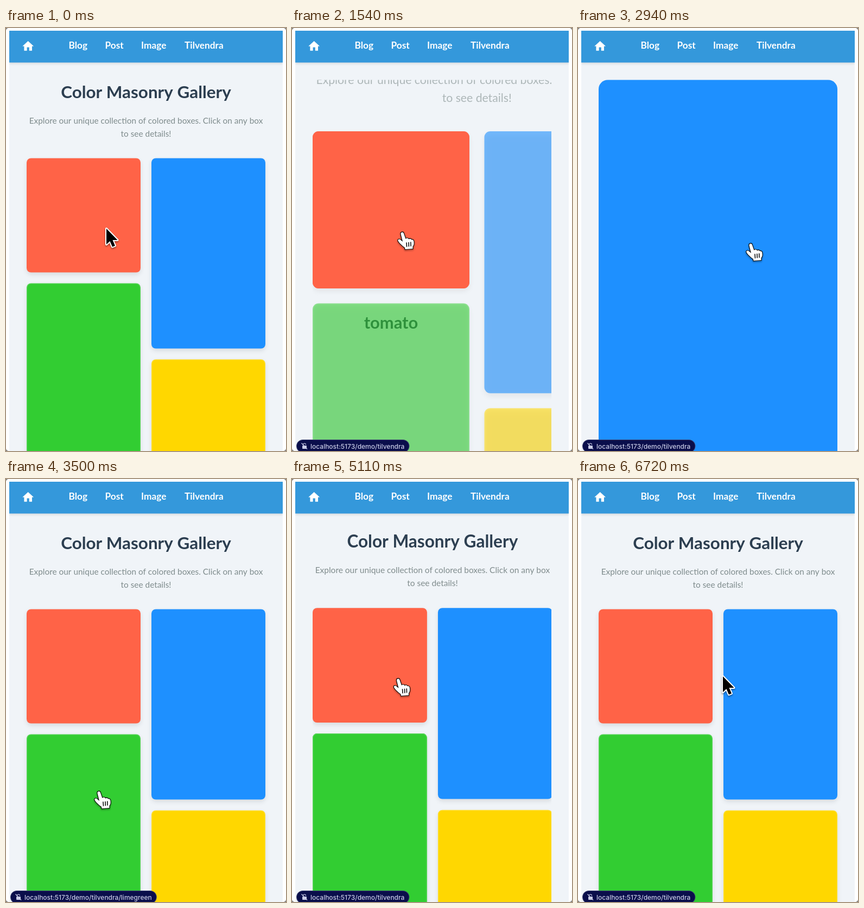
Write an HTML page with a canvas that moves like this. It is 516 px wide and 778 px high and loops after 6790 ms.

```html
<!DOCTYPE html>
<html lang="en">
<head>
<meta charset="utf-8">
<title>Color Masonry Gallery</title>
<style>
  html, body { margin: 0; width: 100%; height: 100%; overflow: hidden; background: #777; }
  canvas { display: block; }
</style>
</head>
<body>
<canvas width="516" height="778"></canvas>
<script>
const ctx = document.querySelector('canvas').getContext('2d');
const LOOP = 6790, STEP = 70, SPRING = 0.0145, SETTLE = 540;
const LEFT = 38, TOP = 95.5, COLUMN = 210, FULL = 440, PATH = 'localhost:5173/demo/tilvendra';
const INK = '#2c3e50', BLUE = '#3498db';

const boxes = [
  { name: 'tomato', color: '#ff6347', x: 38, y: 239.5, h: 210 },
  { name: 'dodgerblue', color: '#1e90ff', x: 268, y: 239.5, h: 350 },
  { name: 'limegreen', color: '#32cd32', x: 38, y: 469.5, h: 400, edge: true },
  { name: 'gold', color: '#ffd700', x: 268, y: 609.5, h: 300, edge: true }
];

// [start, box, opening]
const zooms = [
  [590, 0, true], [1385, 0, false],
  [2200, 1, true], [2940, 1, false],
  [3600, 2, true], [4575, 2, false],
  [5416, 0, true], [6175, 0, false]
];

// [time, x, y]
const pointer = [
  [0, 185, 369], [250, 345, 190], [490, 203, 376], [1680, 203, 376],
  [2100, 335, 402], [2240, 318, 397], [2940, 318, 397], [3430, 171, 575],
  [4200, 171, 575], [4480, 251, 472], [4620, 251, 472], [5180, 193, 363],
  [5320, 193, 363], [5810, 268, 369], [6230, 268, 369], [6400, 267, 363], [LOOP, 267, 363]
];

const statuses = [
  [0, null], [1400, ''], [2100, '/dodgerblue'], [2450, ''], [3360, '/limegreen'],
  [3920, ''], [5180, '/tomato'], [5600, '']
];

const home = new Path2D('M10 20v-6h4v6h5v-8h3L12 3 2 12h3v8z');
const arrow = new Path2D('M0 0V29L6.5 23L11 33.5L16 31.5L11.5 21H20.5Z');
const hand = new Path2D('M-2.5 3C-3-1 2-2 3 2L6.5 12C8 10 11 10 12 12.5C14 11 16.5 11.5 17 13.5' +
  'C19 12.5 21 14 21.3 16C22 20 22 23 19.5 26V30L5.5 31L5 28C1 25-5 20-7.5 15.5' +
  'C-8.5 12.5-5 11.5-2.5 14L1 17Z');
const knuckles = new Path2D('M8 19l.5 7M12 18.5l.3 7M15.8 18l.2 7');

const lerp = (a, b, k) => a + (b - a) * k;
const latest = (list, t) => list.filter(item => item[0] <= t).pop();

function text(str, x, y, font, color, align = 'center') {
  ctx.font = font;
  ctx.fillStyle = color;
  ctx.textAlign = align;
  ctx.fillText(str, x, y);
}

function panel(x, y, w, h, r, color) {
  ctx.beginPath();
  ctx.roundRect(x, y, w, h, r);
  ctx.fillStyle = color;
  ctx.fill();
}

function shadow(y, blur, alpha) {
  ctx.shadowColor = `rgba(0,0,0,${alpha})`;
  ctx.shadowOffsetY = y;
  ctx.shadowBlur = blur;
}

function group(draw) {
  ctx.save();
  draw();
  ctx.restore();
}

function drawBox(box, scale, shaded) {
  group(() => {
    if (shaded) shadow(4 * scale, 8 * scale, 0.1);
    panel(box.x, box.y, COLUMN, box.h, 8, box.color);
  });
  if (!box.edge) return;
  ctx.beginPath();
  ctx.roundRect(box.x + 0.75, box.y + 0.75, COLUMN - 1.5, box.h - 1.5, 7.3);
  ctx.strokeStyle = 'rgba(255,255,255,.15)';
  ctx.lineWidth = 1.5;
  ctx.stroke();
}

function drawGallery(scale) {
  text('Color Masonry Gallery', 258, 129, '700 31.4px Lato, sans-serif', INK);
  const font = '400 15.4px Lato, sans-serif';
  text('Explore our unique collection of colored boxes. Click on any box', 258, 176, font, '#7f8c8d');
  text('to see details!', 258, 200, font, '#7f8c8d');
  boxes.forEach(box => drawBox(box, scale, true));
}

function drawDetails(box, opening) {
  const mid = FULL / 2, bottom = box.h * FULL / COLUMN;
  text(box.name, mid, bottom + 113, '700 47px Lato, sans-serif', INK);
  if (!opening) return;
  text(`Height: ${Math.round(box.h * 10 / 7)}px`, mid, bottom + 184, '400 23.6px Lato, sans-serif', INK);
  panel(mid - 56, bottom + 212, 112, 35, 4, BLUE);
  text('Copy Color', mid, bottom + 235, '16px "Liberation Sans", sans-serif', '#fff');
}

function drawContent(t) {
  const [start, index, opening] = latest(zooms, t) || [-LOOP, 0, false];
  const box = boxes[index], age = t - start, u = SPRING * age;
  const eased = age > SETTLE ? 1 : 1 - (1 + u) * Math.exp(-u);
  const p = opening ? eased : 1 - eased;
  const scale = lerp(1, FULL / COLUMN, p);
  const x = lerp(box.x, LEFT, p), y = lerp(box.y, TOP, p);

  group(() => {
    if (p > 0 && p < 1) {
      ctx.beginPath();
      ctx.rect(LEFT, TOP, FULL, 700);
      ctx.clip();
    }
    // The detail page lies beneath the fading gallery; the chosen box stays solid on top.
    ctx.translate(x, y);
    group(() => {
      ctx.scale(scale * COLUMN / FULL, scale * COLUMN / FULL);
      if (p > 0) drawDetails(box, opening || p === 1);
    });
    ctx.scale(scale, scale);
    ctx.translate(-box.x, -box.y);
    ctx.globalAlpha = (1 - p) ** 1.24;
    if (p < 1) drawGallery(scale);
    ctx.globalAlpha = 1;
    if (p > 0) drawBox(box, scale, false);
  });
}

function drawFrame() {
  ctx.fillStyle = '#777';
  ctx.fillRect(0, 0, 516, 778);
  panel(0, 0, 516, 778, 5, '#fff');
  ctx.fillStyle = '#f0f4f8';
  ctx.fillRect(6, 5, 504, 773);
}

function drawHeader() {
  group(() => {
    ctx.beginPath();
    ctx.rect(6, 5, 504, 80);
    ctx.clip();
    shadow(2, 4, 0.1);
    ctx.fillStyle = BLUE;
    ctx.fillRect(6, 5, 504, 58.5);
  });
  [['Blog', 115.5], ['Post', 182.5], ['Image', 249], ['Tilvendra', 329]].forEach(([label, x]) =>
    text(label, x, 38.3, '700 17.3px Lato, sans-serif', '#fff', 'left'));
  group(() => {
    ctx.translate(28.2, 21);
    ctx.scale(1.04, 1.04);
    ctx.fill(home);
  });
}

function drawStatus(t) {
  const suffix = latest(statuses, t)[1];
  if (suffix === null) return;
  const label = PATH + suffix;
  ctx.font = '500 12px Inter, sans-serif';
  const width = ctx.measureText(label).width + 35;
  panel(8, 757, width, 24, 12, '#3c4170');
  panel(9, 758, width - 2, 22, 11, '#0a0e4b');
  text(label, 34, 773.5, ctx.font, '#c8cbe6', 'left');
  panel(19, 768, 8, 6, 1, '#c8cbe6');
  ctx.strokeStyle = '#c8cbe6';
  ctx.lineWidth = 1.2;
  ctx.beginPath();
  ctx.arc(23, 766.5, 2.5, Math.PI, 0);
  ctx.moveTo(17.5, 763.5);
  ctx.lineTo(28, 774.5);
  ctx.stroke();
}

function drawPointer(t) {
  const i = pointer.findIndex(key => key[0] > t);
  const [t0, x0, y0] = pointer[i - 1], [t1, x1, y1] = pointer[i];
  const k = (t - t0) / (t1 - t0), ease = k * k * (3 - 2 * k);
  const isHand = t >= 420 && t < 6480;
  const shape = isHand ? hand : arrow;
  group(() => {
    ctx.translate(lerp(x0, x1, ease), lerp(y0, y1, ease));
    ctx.lineJoin = ctx.lineCap = 'round';
    ctx.strokeStyle = isHand ? '#000' : '#fff';
    ctx.lineWidth = isHand ? 2.2 : 4;
    group(() => {
      shadow(2, 3, 0.4);
      ctx.stroke(shape);
    });
    ctx.fillStyle = isHand ? '#fff' : '#000';
    ctx.fill(shape);
    ctx.lineWidth = 1.5;
    if (isHand) ctx.stroke(knuckles);
  });
}

function render(now) {
  const t = Math.floor((now % LOOP) / STEP) * STEP;
  drawFrame();
  drawContent(t);
  drawHeader();
  drawStatus(t);
  drawPointer(t);
  requestAnimationFrame(render);
}
requestAnimationFrame(render);
</script>
</body>
</html>
```
